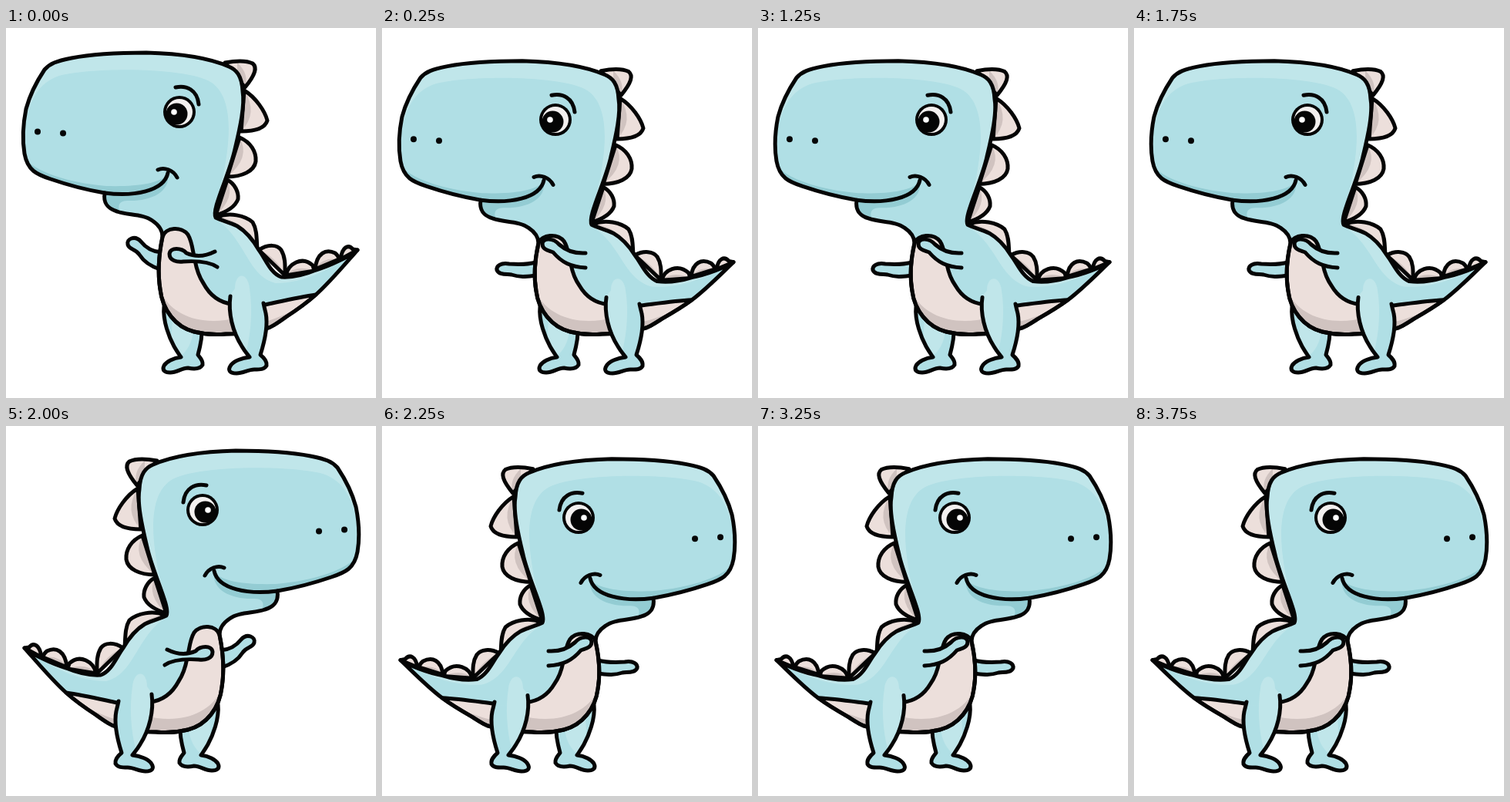
Write an HTML page that moves like this. It is 480 by 480 pixels and loops after 4 s.

```html
<!DOCTYPE html>
<html lang="en">
<head>
<meta charset="utf-8">
<title>Dancing dinosaur</title>
<style>
  html, body { margin: 0; width: 100%; height: 100%; overflow: hidden; background: #fff; }
  svg { display: block; width: 100vw; height: 100vh; }
  .line { fill: none; stroke: #050505; stroke-width: 5; stroke-linecap: round; stroke-linejoin: round; }
</style>
</head>
<body>
<svg id="stage" viewBox="0 0 480 480"></svg>
<script>
const SKIN = '#b0dfe5', LIGHT = '#c0e6ea', SHADE = '#93ccd3';
const PINK = '#ecdfdb', PINK_SHADE = '#d0c3c0';
const STEP = 250, LOOP = 4000;

const underside = `C345,388 352,383 363,375 C380,364 393,354 402,346`;

const body = `M128,214 C126,227 131,234 144,238 C157,243 178,241 190,250 C199,256 203,263 203,271
  C198,295 197,320 200,339 C203,366 220,388 244,394 C260,398 275,398 285,397 C310,397 330,393 340,389
  ${underside} C420,330 440,306 456,288 C446,296 420,309 402,314 C390,319 372,324 357,323
  C343,318 337,300 328,288 C320,274 310,263 300,257 C290,252 280,250 272,246
  C266,236 290,190 297,157 C304,128 310,100 307,82 C306,62 299,54 289,50
  C262,38 220,33 182,32 C150,32 110,34 85,39 C65,43 57,46 50,54 C38,72 30,90 26,105
  C22,125 21,145 24,163 C28,185 40,190 58,196 C90,207 110,211 128,214Z`;

const belly = `M203,271 C207,258 228,257 236,268 C242,278 242,290 245,301 C247,312 250,322 256,331
  C264,346 276,356 293,358 L336,359 C355,355 380,349 402,346 C393,354 380,364 363,375
  C352,383 345,388 340,389 C330,393 310,397 285,397 C275,398 260,398 244,394
  C220,388 203,366 200,339 C197,320 198,295 203,271Z`;

const spikes = [
  'M284,45 C300,42 312,42 320,46 C326,51 324,60 310,77Z',
  'M309,81 C324,90 336,108 339,120 C336,130 322,134 305,134Z',
  'M303,142 C317,148 325,160 324,173 C322,186 306,193 287,193Z',
  'M287,197 C297,202 302,213 301,222 C297,233 285,239 272,243Z',
  'M274,245 C290,239 310,243 320,252 C326,262 325,275 326,287Z',
  'M328,288 C340,280 352,281 357,288 C363,298 362,310 362,321Z',
  'M363,321 C366,306 384,295 398,308 L400,315Z',
  'M401,313 C403,292 415,286 427,292 Q431,295 432,300Z',
  'M434,300 C436,284 444,280 450,287 L456,288Z'
];
const spikeShade = `M300,45 Q316,60 310,77 L300,60Z M309,81 Q328,110 305,134Z
  M303,142 Q318,168 287,193Z M287,197 Q298,220 272,243Z M274,245 Q312,250 326,287Z
  M328,288 Q350,296 362,321Z M363,321 Q376,306 400,315Z M401,313 Q410,297 432,300Z`;

const nearLeg = `M291,348 C288,370 294,394 306,413 C310,420 314,424 316,427
  C306,428 296,432 292,437 C287,444 290,448 299,448 C308,448 314,443 322,443
  C330,443 335,443 338,438 C339,432 335,428 330,424 C336,405 340,385 337,370 Q335,362 334,357`;
const farLeg = `M205,361 C203,380 212,402 218,413 C222,420 225,424 227,427
  C217,428 208,433 205,438 C202,444 206,447 213,447 C222,447 228,441 236,441
  C245,443 252,442 255,437 C256,431 252,428 249,424 C252,413 255,400 254,388`;
const nearLight = 'M297,338 C297,316 314,316 316,338 C320,365 318,395 312,418 L300,400 L288,350Z';
const farLight = 'M216,380 L243,392 C242,408 234,420 228,424 L214,405Z';

const arms = {
  up: {
    far: `M201,291 C190,290 182,286 175,277 C167,268 156,274 158,281
      C160,288 168,286 173,294 C180,305 190,310 200,313`,
    near: `M271,290 C257,297 245,297 234,292 C228,285 213,284 212,293
      C212,302 222,304 230,303 C245,302 262,302 274,310`
  },
  down: {
    far: `M200,304 C188,307 178,307 165,306 C154,304 148,309 149,314
      C152,321 162,319 168,320 C180,324 190,322 200,321`,
    near: `M264,292 C248,293 238,288 230,281 C222,272 209,272 208,280
      C208,288 217,289 222,291 C233,304 245,310 264,311`
  }
};

const clamp = v => Math.max(0, Math.min(1, v));

// The squat lowers the head fully, fades out towards the feet, and dips the tail.
const squat = (x, y) =>
  9.2 * clamp((365 - y) / 105) + Math.max(0, 217 - y) * 0.008 +
  (y > 250 ? 9 * clamp((x - 330) / 126) : 0);

function dinosaur(id, { low, blink, flip }) {
  const bend = d => low
    ? d.replace(/([\d.]+),([\d.]+)/g, (_, x, y) => `${x},${(+y + squat(+x, +y)).toFixed(1)}`)
    : d;
  const fill = (d, color) => `<path d="${bend(d)}" fill="${color}"/>`;
  const line = d => `<path d="${bend(d)}" class="line"/>`;
  const limb = d => `<path d="${d}" fill="${SKIN}"/><path d="${d}" class="line"/>`;
  const dot = (x, y, r, color) =>
    `<circle cx="${x}" cy="${y + (low ? squat(x, y) : 0)}" r="${r}" fill="${color}"/>`;
  const clip = (name, d, content) =>
    `<clipPath id="${name}${id}"><path d="${bend(d)}"/></clipPath>
     <g clip-path="url(#${name}${id})">${content}</g>`;
  const arm = low ? arms.down : arms.up;

  const eye = blink
    ? line('M209,113 C217,106 231,106 240,113')
    : dot(225, 109, 21, '#050505') + dot(225, 109, 17, '#f3f0ef') +
      dot(221.5, 111.5, 14, '#050505') + dot(218, 109, 3.8, '#fff');

  const skinTones =
    fill(`M20,150 C28,95 40,72 69,62 C110,51 235,50 267,71 C297,92 290,150 282,190 L268,246
      C310,268 312,322 350,331 C385,331 420,315 456,288 L405,350 L290,400 L190,360 L203,271 L120,250 L128,214 L20,200Z`, SKIN) +
    fill(`M20,165 C35,185 75,200 130,205 C170,206 198,202 210,190
      C204,212 160,217 128,214 L90,209 C55,200 24,192 20,165Z`, SHADE) +
    fill(`M128,214 C165,219 205,212 210,190 C213,214 186,225 158,224 C142,224 146,236 150,243 C130,238 126,228 128,214Z`, SHADE);

  const bellyTones =
    fill('M200,342 C217,375 255,387 300,376 L340,380 C365,372 385,360 402,346 L380,400 L220,400Z', PINK_SHADE);

  return `<g id="pose${id}" ${flip ? 'transform="matrix(-1 0 0 1 480 0)"' : ''} display="none">
    ${fill(farLeg, SKIN)}${clip('far', farLeg, fill(farLight, LIGHT))}${line(farLeg)}
    ${limb(arm.far)}
    ${spikes.map(d => fill(d, PINK)).join('')}${fill(spikeShade, PINK_SHADE)}${spikes.map(line).join('')}
    ${fill(body, LIGHT)}${clip('skin', body, skinTones)}
    ${fill(belly, PINK)}${clip('belly', belly, bellyTones)}${line(belly)}
    ${line(body)}
    ${fill(nearLeg, SKIN)}${fill('M292,362 L292,340 L334,340 L334,362Z', SKIN)}${fill(nearLight, LIGHT)}${line(nearLeg)}
    ${limb(arm.near)}
    ${line('M128,214 C165,219 205,212 210,188')}
    ${line('M197,184 C205,180 217,184 222,194')}
    ${line('M220,77 C234,74 248,80 250,99')}
    ${dot(41, 134.5, 4, '#050505')}${dot(74, 136.5, 4, '#050505')}
    ${eye}
  </g>`;
}

const poses = [
  {}, { low: true },
  { blink: true }, { low: true, blink: true },
  { flip: true }, { low: true, flip: true }
];
const stage = document.getElementById('stage');
stage.innerHTML = poses.map((pose, i) => dinosaur(i, pose)).join('');
const groups = poses.map((_, i) => document.getElementById('pose' + i));

function poseAt(time) {
  const beat = Math.floor(time % LOOP / STEP);
  const look = beat >= 8 ? 2 : beat === 2 || beat === 3 ? 1 : 0;
  return look * 2 + beat % 2;
}

const start = performance.now();
let shown = -1;
function draw() {
  const next = poseAt(Math.max(0, performance.now() - start));
  if (next !== shown) {
    groups.forEach((g, i) => g.setAttribute('display', i === next ? 'inline' : 'none'));
    shown = next;
  }
  requestAnimationFrame(draw);
}
draw();
</script>
</body>
</html>
```
